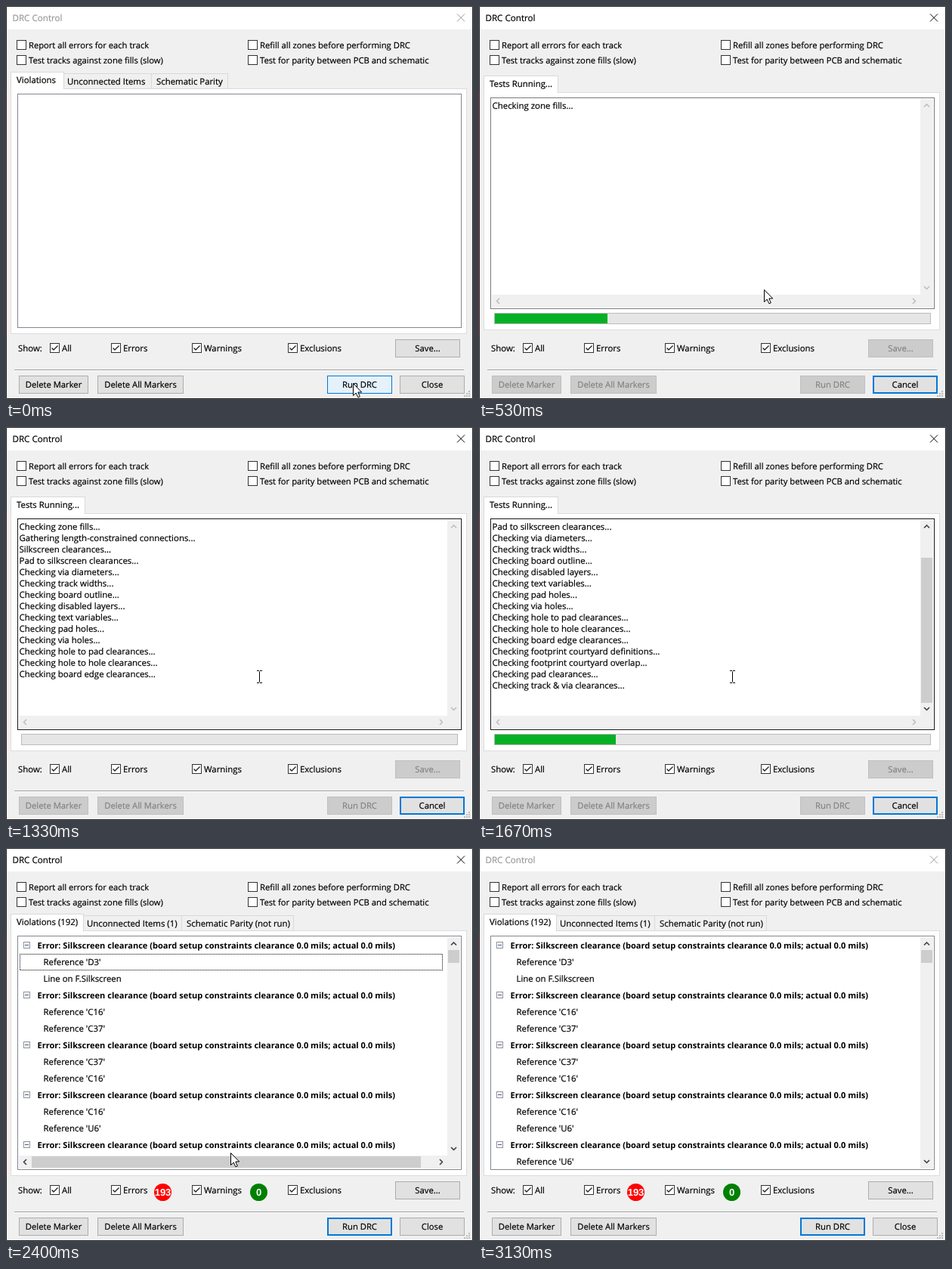
Recreate the animation shown at these times as an HTML page with a canvas. Size 618 by 520 pixels, loop 3540 ms.

```html
<!DOCTYPE html>
<html lang="en">
<head>
<meta charset="utf-8">
<title>DRC Control</title>
<style>
html, body { margin: 0; width: 618px; height: 520px; overflow: hidden; background: #f0f0f0; }
canvas { display: block; }
</style>
</head>
<body>
<canvas id="stage" width="618" height="520"></canvas>
<script>
const ctx = document.getElementById('stage').getContext('2d');
const LOOP = 3540;
const BLUE = '#0078d7';
const FRAME = '#828790';

const LOG = [
  'zone fills', '*Gathering length-constrained connections', '*Silkscreen clearances',
  '*Pad to silkscreen clearances', 'via diameters', 'track widths', 'board outline',
  'disabled layers', 'text variables', 'pad holes', 'via holes', 'hole to pad clearances',
  'hole to hole clearances', 'board edge clearances', 'footprint courtyard definitions',
  'footprint courtyard overlap', 'pad clearances', 'track & via clearances',
  'copper graphic & text clearances', 'copper zone clearances',
  'pad, via and zone connections', 'net connections', 'keepouts & disallow constraints',
  'via annular rings'
].map(s => (s[0] === '*' ? s.slice(1) : 'Checking ' + s) + '...').concat('Done.');

const ERROR = 'Error: Silkscreen clearance (board setup constraints clearance 0.0 mils; actual 0.0 mils)';
const ref = id => `Reference '${id}'`;
const TREE = [
  [ref('D3'), 'Line on F.Silkscreen'], [ref('C16'), ref('C37')], [ref('C37'), ref('C16')],
  [ref('C16'), ref('U6')], [ref('U6')]
].flatMap(items => [ERROR, ...items]);

// [start, number of log lines, progress in px]
const RUN = [
  [270, 1, 0], [330, 1, 35], [470, 1, 112], [530, 1, 149], [600, 1, 190], [730, 1, 265],
  [870, 8, 0], [930, 12, 0], [1000, 12, 70], [1070, 12, 140], [1130, 12, 210],
  [1200, 13, 70], [1270, 13, 180], [1330, 14, 0],
  [1600, 17, 0], [1670, 18, 160], [1730, 19, 300], [1800, 21, 120], [1870, 25, 0]
];

// [start, x, y, shape]
const POINTER = [
  [0, 459, 499, 'arrow'], [330, 445, 474, 'arrow'], [470, 398, 400, 'arrow'],
  [530, 377, 375, 'arrow'], [600, 354, 350, 'arrow'], [730, 335, 330, 'beam'],
  [2270, 331, 342, 'arrow'], [2330, 317, 370, 'arrow'], [2400, 297, 403, 'arrow'],
  [2470, 262, 435, 'arrow'], [2530, 212, 468, 'arrow'], [2600, 160, 500, 'arrow'],
  [2670, 0, 0, 'none']
];

const at = (list, t) => list.reduce((hit, row) => (row[0] <= t ? row : hit), list[0]);

function fill(x, y, w, h, color) {
  ctx.fillStyle = color;
  ctx.fillRect(x, y, w, h);
}

function box(x, y, w, h, bg, border, line = 1) {
  fill(x, y, w, h, border);
  fill(x + line, y + line, w - 2 * line, h - 2 * line, bg);
}

function text(s, x, y, { size = 11.4, color = '#000', bold = false, align = 'left', face = '"Open Sans", "Noto Sans"' } = {}) {
  ctx.font = `${bold ? 'bold ' : ''}${size}px ${face}, sans-serif`;
  ctx.textAlign = align;
  ctx.fillStyle = color;
  ctx.fillText(s, x, y);
  if (bold) return;
  // a hairline outline gives the small type a little more weight
  ctx.strokeStyle = color;
  ctx.lineWidth = .2;
  ctx.strokeText(s, x, y);
}

function path(points, color, width = 1) {
  ctx.beginPath();
  points.forEach(([x, y]) => ctx.lineTo(x, y));
  ctx.strokeStyle = color;
  ctx.lineWidth = width;
  ctx.stroke();
}

function checkbox(x, y, label, checked, size) {
  box(x, y, 13, 13, '#fff', '#333');
  if (checked) path([[x + 2.5, y + 6.5], [x + 5, y + 9], [x + 10.5, y + 3.5]], '#222', 1.4);
  text(label, x + 16, y + 11, { size });
}

const LOOKS = {
  normal: ['#e1e1e1', '#adadad', '#000', 1],
  disabled: ['#ccc', '#bfbfbf', '#838383', 1],
  hover: ['#e5f1fb', BLUE, '#000', 1],
  pressed: ['#cce4f7', '#005499', '#000', 1],
  focus: ['#e1e1e1', BLUE, '#000', 2]
};

function button(x, y, w, label, look) {
  const [bg, border, color, line] = LOOKS[look];
  box(x, y, w, 24, bg, border, line);
  text(label, x + w / 2, y + 16, { size: 11.25, color, align: 'center' });
}

function chevron(x, y, dir, on) {
  const a = { up: [[-3.5, 2], [0, -1.5], [3.5, 2]], down: [[-3.5, -2], [0, 1.5], [3.5, -2]],
    left: [[2, -3.5], [-1.5, 0], [2, 3.5]], right: [[-2, -3.5], [1.5, 0], [-2, 3.5]] }[dir];
  path(a.map(([dx, dy]) => [x + dx, y + dy]), on ? '#444' : '#bfbfbf', 1.7);
}

function vScroll(top, bottom, thumb, size) {
  fill(584, top, 17, bottom - top, '#f0f0f0');
  if (size) fill(585, thumb, 15, size, '#cdcdcd');
  chevron(592.5, top + 8.5, 'up', size);
  chevron(592.5, bottom - 9, 'down', size);
}

function hScroll(y, on) {
  fill(17, y, 584, 17, '#f0f0f0');
  if (on) fill(34, y + 1, 515, 15, '#cdcdcd');
  chevron(25, y + 8.5, 'left', on);
  chevron(576, y + 8.5, 'right', on);
}

function notebook(tabs, top, bottom) {
  const edge = top + 22;
  box(6, edge, 604, bottom - edge, '#fff', '#dcdcdc');
  tabs.forEach(([label, x, right, textX], i) => {
    if (i) {
      box(x, top + 2, right - x + 1, 21, '#f0f0f0', '#d9d9d9');
      text(label, textX, top + 17);
    } else {
      box(x, top, right - x + 1, 23, '#fff', '#d9d9d9');
      fill(x + 1, top + 21, right - x - 1, 3, '#fff');
      text(label, textX, top + 15);
    }
  });
}

function drawRun(t) {
  const [, count, bar] = at(RUN, t);
  notebook([['Tests Running...', 6, 104, 14]], 92, 429);
  box(15, 121, 588, 280, '#fff', t >= 730 ? '#171717' : '#7a7a7a');
  const skip = Math.max(0, count - 15);
  LOG.slice(skip, count).forEach((s, i) => text(s, 17.5, 136 + i * 15, { size: 11.45 }));
  hScroll(382, false);
  const size = skip ? Math.round(226 * 17 / (17 + skip)) : 0;
  vScroll(123, 382, 365 - size, size);
  box(20, 406, 578, 15, '#e6e6e6', '#bcbcbc');
  fill(21, 407, bar, 13, '#06b025');
}

function drawEmpty() {
  notebook([['Violations', 6, 76, 14], ['Unconnected Items', 76, 192, 81],
    ['Schematic Parity', 192, 293, 199]], 87, 434);
  box(15, 116, 588, 310, '#fff', FRAME);
}

// one-pixel dots on every other pixel of a checkerboard
function focusRect(left, top, right, bottom) {
  const dot = (x, y) => (x + y) % 2 || fill(x, y, 1, 1, '#000');
  for (let x = left; x <= right; x++) [top, bottom].forEach(y => dot(x, y));
  for (let y = top; y <= bottom; y++) [left, right].forEach(x => dot(x, y));
}

function drawResults(active) {
  notebook([['Violations (192)', 6, 102, 14], ['Unconnected Items (1)', 102, 232, 107],
    ['Schematic Parity (not run)', 232, 380, 239]], 87, 434);
  box(15, 116, 588, 310, '#fff', FRAME);
  TREE.forEach((s, i) => {
    const y = 129 + i * 22;
    if (s === ERROR) {
      box(23, y - 5, 9, 9, '#fff', '#919191');
      fill(25, y - 1, 5, 1, '#3b5c9e');
      text(s, 41.5, y + 4, { size: 11.05, bold: true });
    } else {
      text(s, 49.5, y + 4);
    }
  });
  if (active) {
    focusRect(18, 140, 577, 161);
    hScroll(407, true);
  }
  vScroll(118, active ? 407 : 424, 135, 17);
}

function badge(x, label, color) {
  ctx.beginPath();
  ctx.arc(x, 455.5, 11.5, 0, 7);
  ctx.fillStyle = color;
  ctx.fill();
  text(label, x, 460, { size: 13, bold: true, color: '#fff', align: 'center', face: '"Liberation Sans", Arial' });
}

function drawPointer(t) {
  const [, x, y, shape] = at(POINTER, t);
  ctx.save();
  ctx.translate(x + .5, y + .5);
  if (shape === 'arrow') {
    ctx.beginPath();
    [[0, 0], [0, 16], [3.7, 12.6], [6.4, 18.3], [8.8, 17.3], [6.3, 11.5], [11.2, 11.5]]
      .forEach(([px, py]) => ctx.lineTo(px, py));
    ctx.closePath();
    ctx.fillStyle = '#fff';
    ctx.fill();
    ctx.strokeStyle = '#000';
    ctx.lineWidth = 1;
    ctx.stroke();
  } else if (shape === 'beam') {
    path([[0, -7], [0, 7]], '#000');
    for (const side of [-1, 1]) {
      path([[-3.5, 8 * side], [-.5, 8 * side]], '#000');
      path([[.5, 8 * side], [3.5, 8 * side]], '#000');
    }
  }
  ctx.restore();
}

function draw(t) {
  const active = t >= 130 && t < 3130;
  const running = t >= 270 && t < 2270;
  const done = t >= 1870;

  fill(0, 0, 618, 520, '#f0f0f0');
  fill(0, 0, 618, 31, '#fff');
  const ink = active ? '#000' : '#999';
  text('DRC Control', 8.5, 20, { size: 11.6, color: ink });
  path([[597, 10.5], [607, 20.5]], ink);
  path([[607, 10.5], [597, 20.5]], ink);

  checkbox(14, 45, 'Report all errors for each track', false, 11.2);
  checkbox(14, 65, 'Test tracks against zone fills (slow)', false, 11.25);
  checkbox(320, 45, 'Refill all zones before performing DRC', false, 11.25);
  checkbox(320, 65, 'Test for parity between PCB and schematic', false, 11.25);

  if (running) drawRun(t);
  else if (t < 270) drawEmpty();
  else drawResults(active);

  text('Show:', 16, 457);
  checkbox(58, 446, 'All', true);
  checkbox(139, 446, 'Errors', true);
  checkbox(246, 446, 'Warnings', true);
  checkbox(373, 446, 'Exclusions', true);
  if (done) {
    badge(207.5, '193', '#f00');
    badge(334.5, '0', '#008000');
  }

  const plain = running ? 'disabled' : 'normal';
  button(515, 441, 86, 'Save...', plain);
  fill(11, 481, 595, 1, '#a0a0a0');
  fill(11, 482, 595, 1, '#fff');
  button(17, 489, 92, 'Delete Marker', plain);
  button(121, 489, 114, 'Delete All Markers', t >= 2600 && t < 2670 ? 'hover' : plain);
  button(425, 489, 86, 'Run DRC', t < 130 ? 'hover' : t < 270 ? 'pressed' : running ? 'disabled' : 'focus');
  button(521, 489, 86, running && !done ? 'Cancel' : 'Close', running ? 'focus' : 'normal');

  for (let r = 0; r < 3; r++)
    for (let c = 2 - r; c < 3; c++) fill(606 + c * 3, 509 + r * 3, 2, 2, '#bcbcbc');

  ctx.strokeStyle = '#222';
  ctx.lineWidth = 1;
  ctx.strokeRect(.5, .5, 617, 519);
  fill(0, 113, 1, 322, '#4a1a1c');
  drawPointer(t);
}

ctx.textRendering = 'geometricPrecision';
ctx.lineJoin = 'round';
const start = performance.now();
function tick() {
  draw((performance.now() - start) % LOOP);
  requestAnimationFrame(tick);
}
tick();
</script>
</body>
</html>
```
